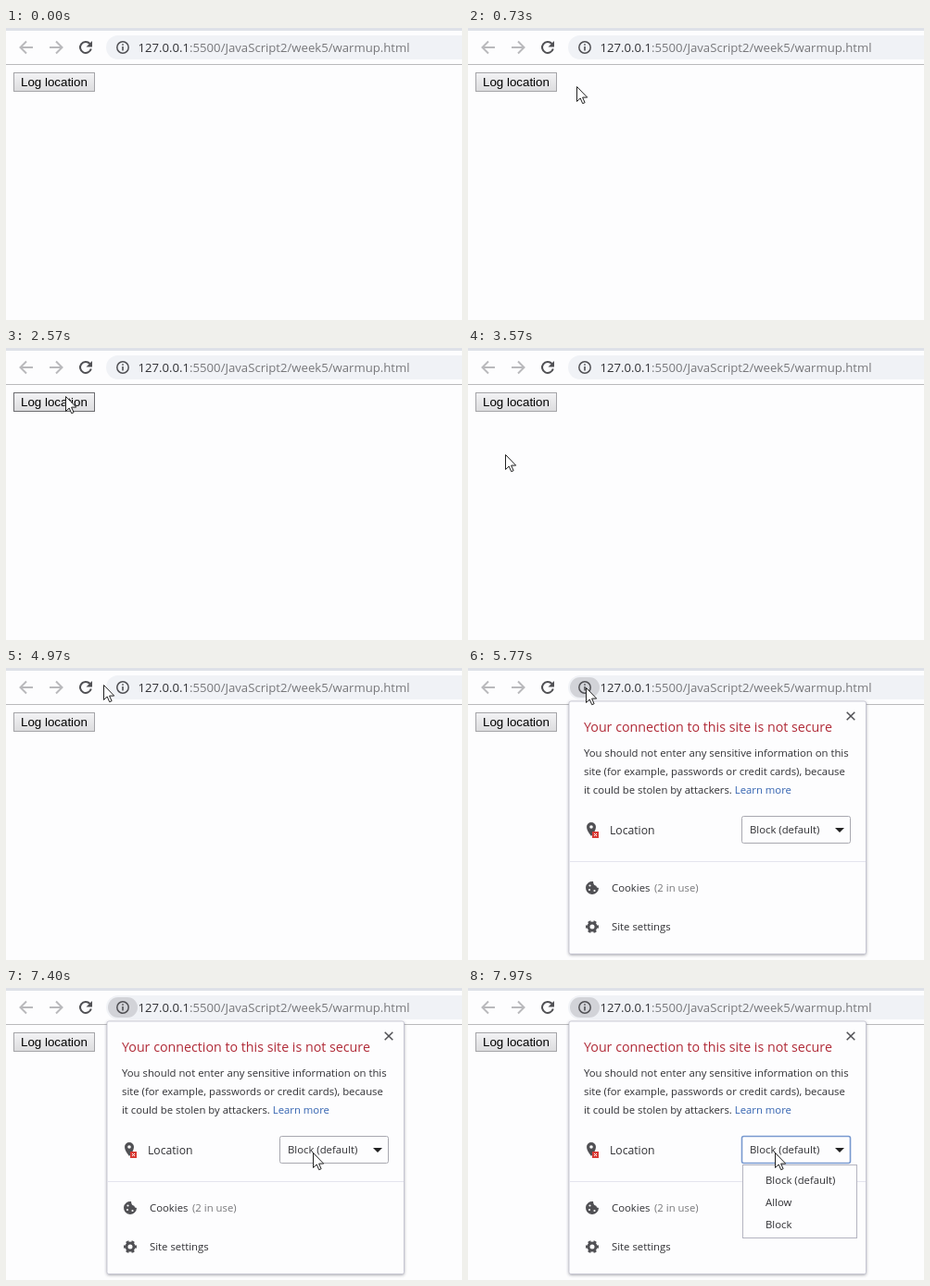
An HTML page for the animation above (8000 ms loop, 492 by 316 pixels).

```html
<!DOCTYPE html>
<html lang="en">
<head>
<meta charset="utf-8">
<title>Location permission</title>
<style>
  html, body { margin: 0; width: 100%; height: 100%; overflow: hidden; background: #fdfdfe; }
  svg { display: block; width: 492px; height: 316px; }
  text { font: 11.33px "Open Sans", "Noto Sans", sans-serif; fill: #303034; white-space: pre; }
  .url { font-size: 13.15px; }
  .button { font: 13.333px "Liberation Sans", Arial, sans-serif; fill: #000; }
  .title { font-size: 14.25px; fill: #b02a37; }
  .label { font-size: 12.2px; }
  .muted { fill: #77777a; }
  .link { fill: #3262b0; }
  .stroke { fill: none; stroke: #505054; stroke-width: 2; }
  .thin { stroke-width: 1.5; }
  .disabled { stroke: #b9b9bc; }
  .icon { fill: #505054; }
  .paper { fill: #fdfdfe; }
</style>
</head>
<body>
<svg viewBox="0 0 492 316">
  <defs>
    <linearGradient id="face" x2="0" y2="1">
      <stop offset="0" stop-color="#f3f3f5"/><stop offset="1" stop-color="#dcdcde"/>
    </linearGradient>
    <filter id="shadow" x="-10%" y="-10%" width="120%" height="120%">
      <feDropShadow dx="0" dy="1" stdDeviation="1.8" flood-color="#404050" flood-opacity=".45"/>
    </filter>
  </defs>
  <rect class="paper" width="492" height="316"/>

  <g id="toolbar">
    <rect width="492" height="3" fill="#dee1e8"/>
    <path d="M492 8H121a13 13 0 0 0 0 26H492z" fill="#f0f2f6"/>
    <path d="M0 39.5H492" stroke="#b9b9bb"/>
    <path class="stroke disabled" d="M29 21H16M22 14.5L15.5 21L22 27.5M47 21H60M54 14.5L60.5 21L54 27.5"/>
    <path class="stroke" d="M90.5 17A6 6 0 1 0 91.8 22.5"/>
    <path class="icon" d="M93 14V20.5H86.5z"/>
    <rect id="siteHover" x="110" y="10" width="32" height="22" rx="11" fill="#d2d3d8"/>
    <circle class="stroke thin" cx="126" cy="21" r="6.2"/>
    <path class="icon" d="M125.2 20h1.6v4.5h-1.6zM125.2 17.2h1.6v1.6h-1.6z"/>
    <text class="url" x="142.5" y="26">127.0.0.1<tspan class="muted">:5500/JavaScript2/week5/warmup.html</tspan></text>
  </g>

  <rect id="logButton" x="8.5" y="48.5" width="87" height="20" fill="url(#face)"/>
  <text class="button" x="16" y="63">Log location</text>

  <g id="popup">
    <rect class="paper" x="109" y="36" width="320.5" height="273.5" rx="2" stroke="#b8b8c8" stroke-width=".7" filter="url(#shadow)"/>
    <path class="stroke thin" d="M408.700 47.700l8.600 8.600M417.300 47.700l-8.600 8.600"/>
    <text class="title" x="125" y="69">Your connection to this site is not secure</text>
    <text x="125" y="96">You should not enter any sensitive information on this</text>
    <text x="125" y="116">site (for example, passwords or credit cards), because</text>
    <text x="125" y="136">it could be stolen by attackers. <tspan class="link">Learn more</tspan></text>

    <path class="icon" fill-rule="evenodd" d="M133 182C130 178 128 175 128 172a5 5 0 0 1 10 0C138 175 136 178 133 182zM131.200 172a1.800 1.800 0 1 0 3.600 0a1.800 1.800 0 1 0-3.600 0"/>
    <rect x="134" y="177" width="7" height="7" fill="#d83a34"/>
    <path d="M136 179l3 3M139 179l-3 3" stroke="#fff"/>
    <text class="label" x="153" y="180">Location</text>
    <rect id="select" class="paper" x="295.5" y="160.5" width="117" height="29" rx="2"/>
    <text x="304" y="179">Block (default)</text>
    <path d="M396 173h10l-5 5z" fill="#222"/>

    <path d="M109 209.500H429" stroke="#e4e4ee"/>
    <path class="icon" d="M135 231a7 7 0 1 0 6 7q-2.500 0-2.700-2.300q-3-.2-3.300-4.700z"/>
    <g class="paper">
      <circle cx="131.500" cy="235.500" r="1.100"/><circle cx="131" cy="240" r="1.100"/><circle cx="136.500" cy="241" r="1.100"/>
    </g>
    <text x="155" y="242">Cookies <tspan class="muted" x="201">(2 in use)</tspan></text>
    <g fill="none" stroke="#505054">
      <circle cx="134" cy="280" r="4" stroke-width="3"/>
      <circle cx="134" cy="280" r="6" stroke-width="2" pathLength="12" stroke-dasharray="1" stroke-dashoffset=".5"/>
    </g>
    <text x="155" y="284">Site settings</text>

    <g id="menu">
      <rect class="paper" x="296.5" y="191.5" width="123" height="79" stroke="#b4b4c0"/>
      <text x="321" y="212">Block (default)</text>
      <text x="321" y="236">Allow</text>
      <text x="321" y="260">Block</text>
    </g>
  </g>

  <path id="pointer" d="M.5.5V16.500L4.200 13L6.700 18.700L9.100 17.700L6.600 12.100H11.700z" fill="#fff" stroke="#222"/>
</svg>
<script>
const LOOP = 8000;
const POPUP_OPENS = 5600, MENU_OPENS = 7640;
// Pointer waypoints: time, x, y
const path = [
  [60, 482, 262], [780, 112, 60], [1250, 64, 56], [1450, 64, 52],
  [2550, 64, 52], [3000, 46, 126], [3350, 40, 115],
  [4250, 40, 115], [4850, 103, 20], [4970, 105, 18],
  [5300, 127, 21], [5900, 127, 21], [6600, 285, 124],
  [6720, 285, 124], [7300, 331, 178], [LOOP, 331, 178]
];
const $ = id => document.getElementById(id);
const show = (id, visible) => $(id).setAttribute("display", visible ? "inline" : "none");
const ease = p => p * p * (3 - 2 * p);

function pointerAt(t) {
  const i = Math.max(1, path.findIndex(point => point[0] > t));
  const [t0, x0, y0] = path[i - 1], [t1, x1, y1] = path[i];
  const p = ease(Math.max(0, (t - t0) / (t1 - t0)));
  return [x0 + (x1 - x0) * p, y0 + (y1 - y0) * p].map(Math.round);
}

function draw(t) {
  const [x, y] = pointerAt(t);
  const overButton = x >= 8 && x < 96 && y >= 48 && y < 69;
  const popupOpen = t >= POPUP_OPENS, menuOpen = t >= MENU_OPENS;
  show("pointer", t >= path[0][0]);
  $("pointer").setAttribute("transform", `translate(${x} ${y})`);
  $("logButton").setAttribute("stroke", overButton ? "#6c6c70" : "#a4a4a8");
  show("siteHover", popupOpen || (x >= 110 && x < 142 && y < 32));
  show("popup", popupOpen);
  show("menu", menuOpen);
  $("select").setAttribute("stroke", menuOpen ? "#7899cf" : "#a8a8b0");
  $("select").setAttribute("stroke-width", menuOpen ? 1.6 : 1);
}

const start = performance.now();
function tick() {
  draw((performance.now() - start) % LOOP);
  requestAnimationFrame(tick);
}
tick();
</script>
</body>
</html>
```
